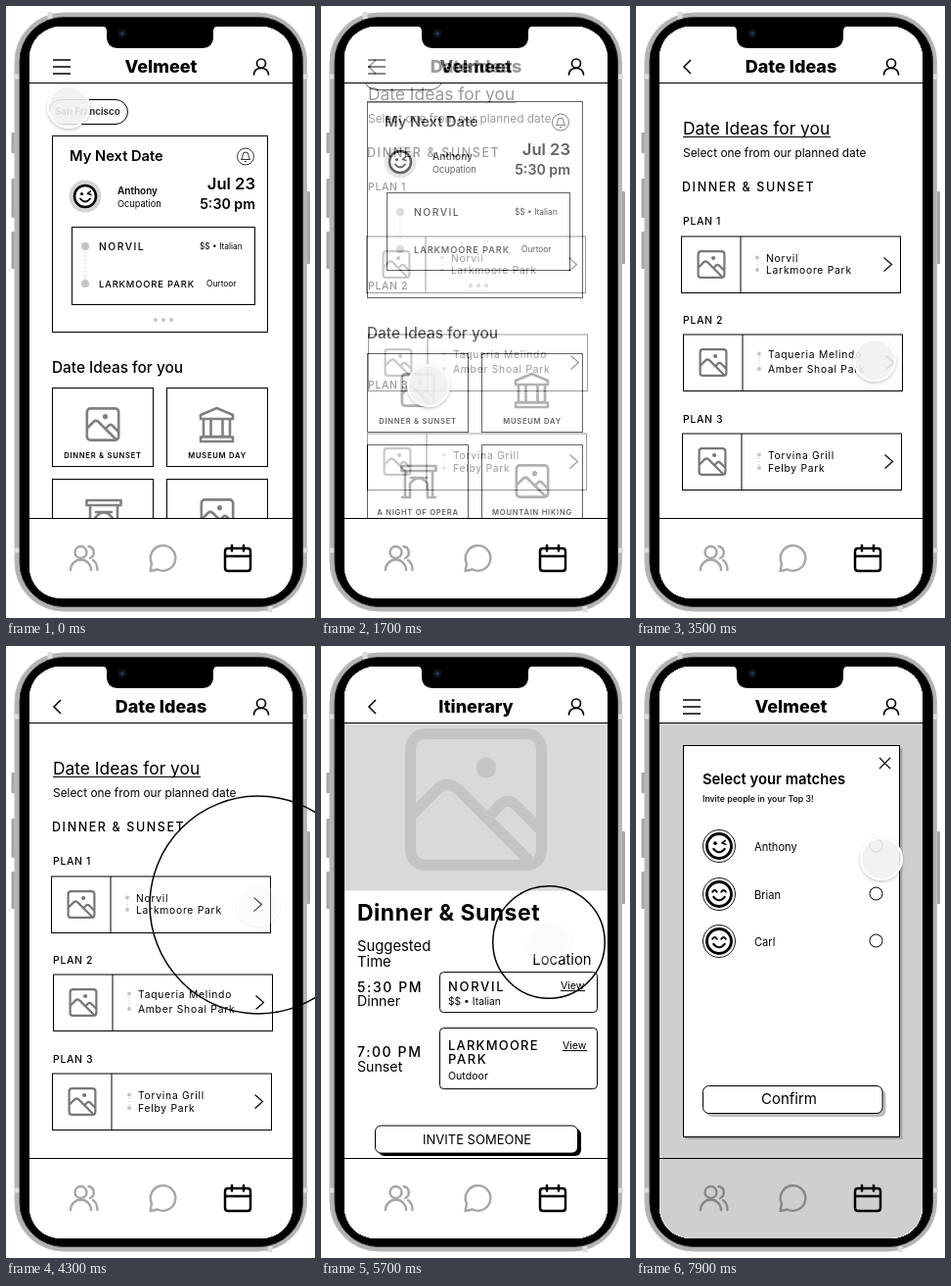
Recreate the animation shown at these times as an HTML page. Size 316x624 px, loop 8000 ms.

```html
<!DOCTYPE html>
<html lang="en">
<head>
<meta charset="utf-8">
<title>Date planner prototype</title>
<style>
html, body { margin: 0; width: 316px; height: 624px; overflow: hidden; background: #fff; }
svg { display: block; font-family: Inter, "Open Sans", sans-serif; }
</style>
</head>
<body>
<svg id="stage" width="316" height="624" viewBox="0 0 316 624"></svg>
<script>
const stage = document.getElementById('stage');

// Drawing helpers
const text = (x, y, str, size, weight = 400, spacing = 0, attrs = '') =>
  `<text x="${x}" y="${y}" font-size="${size}" font-weight="${weight}" letter-spacing="${spacing}" ${attrs}>${str}</text>`;
const middle = 'text-anchor="middle"', end = 'text-anchor="end"';
const rect = (x, y, w, h, fill = '#fff', stroke = '#000', rx = 0) =>
  `<rect x="${x}" y="${y}" width="${w}" height="${h}" rx="${rx}" fill="${fill}" stroke="${stroke}"/>`;
const dot = (x, y, r, fill, stroke = 'none', width = 1) =>
  `<circle cx="${x}" cy="${y}" r="${r}" fill="${fill}" stroke="${stroke}" stroke-width="${width}"/>`;
const line = (d, stroke = '#000', width = 1, attrs = '') =>
  `<path d="${d}" fill="none" stroke="${stroke}" stroke-width="${width}" ${attrs}/>`;
const round = 'stroke-linecap="round" stroke-linejoin="round"';
const group = (id, body) => `<g id="${id}">${body}</g>`;
const clipped = body => `<g clip-path="url(#view)">${body}</g>`;

const picture = (x, y, size, color) => `<g transform="translate(${x} ${y}) scale(${size / 145})">
  <rect x="5.5" y="5.5" width="134" height="134" rx="15" fill="none" stroke="${color}" stroke-width="11"/>
  ${dot(83, 40, 10.5, color)}
  ${line('M6 89L33 62Q43 52 54 62L131 139M83 93L96 79Q104 70 113 78L139 104', color, 11)}</g>`;

const face = (x, y, r, wink) => dot(x, y, r, '#fff', '#000', r * .23) +
  `<g transform="translate(${x} ${y}) scale(${r / 11})">` +
  line('M-5 2.5Q0 8.5 5 2.5', '#000', 1.9, round) +
  (wink ? dot(-3.5, -2.5, 1.6, '#000') + line('M5.5 -5L2.5 -2.8L6 -1.5', '#000', 1.5, round)
        : line('M-6 -2Q-4 -5 -2 -2M2 -2Q4 -5 6 -2', '#000', 1.7, round)) + '</g>';

const person = dot(261, 58.5, 4.5, 'none', '#000', 1.7) +
  line('M253.5 70Q254 63.5 261 63.5T268.5 70', '#000', 1.7, round);
const menuIcon = line('M48 55H66M48 62H66M48 69H66', '#000', 1.5);
const backIcon = line('M56 55L49 62L56 69', '#000', 1.5);
const header = (title, icon) => rect(24, 21, 269, 57, '#fff', 'none') + icon + person +
  text(158.5, 68, title, 18, 800, 0, middle) + line('M24 78.5H293');

const nav = rect(24, 523, 269, 81, '#fff', 'none') + line('M24 522.5H293') +
  dot(76.5, 557, 6, 'none', '#a6a6a6', 2.4) +
  line(`M66 575A10.5 10.5 0 0 1 87 575M84.5 551A6.3 6.3 0 0 1 86 563M89 565Q93.5 568 93.5 575
    M147.5 576L149 568.5A12.8 12.8 0 1 1 155 574.5Z`, '#a6a6a6', 2.4, round) +
  line('M227 553H247Q250 553 250 556V573Q250 576 247 576H227Q224 576 224 573V556Q224 553 227 553ZM224 561H250M231 550V555.5M243 550V555.5', '#000', 2.5, round);

const screen = (id, title, icon, body) => group(id,
  rect(24, 21, 269, 583, '#fff', 'none') + clipped(body) + header(title, icon) + nav);

// Home
const brand = 'Velmeet';
const gray = '#808080', pale = '#c4c4c4';
const tile = (x, y, label) => rect(x, y, 103, 80) + text(x + 51.5, y + 71, label, 7.6, 600, .75, middle);
const museum = line('M199 421V417L215.5 410L232 417V421ZM202 421V439M209.5 421V439M221.5 421V439M229 421V439M202 439H229M199 444H232V439.5H199Z', gray, 2.6, round);
const opera = line('M82.5 504H117.5V509H82.5ZM86 509V536M114 509V536M83 536H91V522Q100 511 109 522V536H117M92 516H108', gray, 2.6, round);
const home = screen('home', brand, menuIcon, group('homeScroll',
  rect(44, 95.5, 80.5, 25, '#fff', '#000', 12.5) + text(50, 111, 'San Francisco', 9.7, 700, 0, 'fill="#333"') +
  rect(47.5, 132.5, 220, 200) + text(65, 158, 'My Next Date', 14.7, 600) +
  dot(245, 153.5, 8.5, 'none', '#000', .8) +
  line('M240.5 156.5Q242 155 242 152Q242 149 245 149T248 152Q248 155 249.5 156.5ZM244 158.5H246', '#000', .8) +
  dot(81, 194, 16.5, '#d4d4d4') + face(81, 194, 11, true) +
  text(114, 192, 'Anthony', 10, 600) + text(114, 205, 'Ocupation', 9.2) +
  text(255, 187, 'Jul 23', 16.6, 600, 0, end) + text(255, 207, '5:30 pm', 14.2, 600, 0, end) +
  rect(67.5, 225.5, 187, 79) + line('M81 250V279', pale, 1, 'stroke-dasharray="1.5 2.5"') +
  dot(81, 245, 4, pale) + dot(81, 283, 4, pale) +
  text(95, 249, 'NORVIL', 10.3, 500, 1.5) + text(198, 248, '$$ • Italian', 8.4) +
  text(95, 286.5, 'LARKMOORE PARK', 9.3, 500, .9) + text(205, 286, 'Ourtoor', 8.4) +
  [153, 161, 169].map(x => dot(x, 320, 2, pale)).join('') +
  text(47, 374, 'Date Ideas for you', 15.4, 500) +
  tile(47.5, 389.5, 'DINNER &amp; SUNSET') + picture(81.5, 409, 35, gray) +
  tile(164.5, 389.5, 'MUSEUM DAY') + museum +
  tile(47.5, 482.5, 'A NIGHT OF OPERA') + opera +
  tile(164.5, 482.5, 'MOUNTAIN HIKING') + picture(198.5, 502, 35, gray)));

// Date ideas
const plan = (x, y, tx, first, second, y1, y2) => rect(x, y, 224, 57.5, 'none') +
  line(`M${x + 60.5} ${y}V${y + 57.5}`) + picture(x + 16, y + 14, 29, '#777') +
  line(`M${tx - 9} ${y1 - 4}V${y2 - 4}`, pale, 1, 'stroke-dasharray="1 2"') +
  dot(tx - 9, y1 - 4.5, 2, pale) + dot(tx - 9, y2 - 4, 2, pale) +
  text(tx, y1, first, 10.3, 400, .75) + text(tx, y2, second, 10.3, 400, .75) +
  line(`M${x + 207} ${y + 21.5}L${x + 215} ${y + 28.5}L${x + 207} ${y + 35.5}`, '#000', 1.2);
const ideas = screen('ideas', 'Date Ideas', backIcon, group('headings',
  text(48, 131, 'Date Ideas for you', 17.4) + line('M48 133.5H199') +
  text(48, 154, 'Select one from our planned date', 11.9) +
  text(47, 189, 'DINNER &amp; SUNSET', 12.5, 500, 1.6) +
  [223, 324, 425].map((y, i) => text(48, y, 'PLAN ' + (i + 1), 10.5, 500, .65)).join('')) +
  plan(46.5, 235, 133, 'Norvil', 'Larkmoore Park', 261, 273) +
  plan(48.5, 335, 135, 'Taqueria Melindo', 'Amber Shoal Park', 359, 374) +
  plan(47.5, 436, 135, 'Torvina Grill', 'Felby Park', 462, 475));

// Itinerary
const view = (x, y) => text(x, y, 'View', 10.6) + line(`M${x} ${y + 1.5}H${x + 25}`);
const itinerary = screen('itinerary', 'Itinerary', backIcon, group('itineraryScroll',
  rect(24, 70, 269, 194.5, '#d9d9d9', 'none') + picture(86, 99, 145, pale) +
  text(37, 295, 'Dinner &amp; Sunset', 23, 700, .5) +
  text(37, 326, 'Suggested', 14.8) + text(37, 342, 'Time', 14.8) + text(276.5, 340, 'Location', 14.8, 400, 0, end) +
  text(37, 368, '5:30 PM', 14, 500, 1.6) + text(37, 382, 'Dinner', 14.2) +
  text(37, 434, '7:00 PM', 14, 500, 1.6) + text(37, 449, 'Sunset', 14.2) +
  rect(121.5, 347.5, 161, 41, '#fff', '#000', 4) + text(130, 367, 'NORVIL', 13, 500, 1.7) +
  text(130, 381, '$$ • Italian', 10.3) + view(245, 365) +
  rect(121.5, 404.5, 161, 62, '#fff', '#000', 4) + text(130, 427, 'LARKMOORE', 13, 500, 1.2) +
  text(130, 441, 'PARK', 13, 500, 1.6) + text(130, 457, 'Outdoor', 10.6) + view(247, 426) +
  rect(59, 507, 207, 28, '#000', 'none', 6) + rect(55.5, 504, 207, 28, '#fff', '#000', 6) +
  text(159.5, 522.5, 'INVITE SOMEONE', 13, 400, 0, middle)));

// Match picker
const match = (y, name, wink) => dot(85, y, 16.5, '#fff', '#000', .9) + face(85, y, 12.5, wink) +
  text(121, y + 4.5, name, 11.1) + dot(245.5, y - .5, 6.5, '#fff', '#000', 1);
const matches = screen('matches', brand, menuIcon, '').replace(/<\/g>$/, '') +
  rect(24, 79, 269, 525, 'rgba(0,0,0,.19)', 'none') +
  rect(50.5, 104, 222, 399, 'rgba(0,0,0,.2)', 'none') + rect(48.5, 101.5, 221, 399) +
  line('M249 114L260 125M260 114L249 125', '#000', 1.2) +
  text(68, 141, 'Select your matches', 14.8, 600) + text(68, 159, 'Invite people in your Top 3!', 8.8, 500) +
  match(204, 'Anthony', true) + match(253, 'Brian') + match(301, 'Carl') +
  rect(72, 452, 183.5, 28, '#bbb', 'none', 6) + rect(68.5, 448.5, 183.5, 28, '#fff', '#000', 6) +
  text(156.5, 467, 'Confirm', 15, 400, 0, middle) + '</g>';

// Phone body
const body = rect(5.5, 129, 6, 21, '#a6a6a6', 'none', 1) + rect(5.5, 176, 6, 40, '#a6a6a6', 'none', 1) +
  rect(5.5, 230, 6, 38, '#a6a6a6', 'none', 1) + rect(305, 189, 6, 74, '#a6a6a6', 'none', 1) +
  rect(9, 7, 298.5, 610, '#b2b2b2', '#bdbdbd', 50) +
  line('M8 72H14M303 72H309M8 555H14M303 555H309M45 6V13M270 612V618', '#ddd', 5) +
  rect(14, 11.5, 289.5, 601, '#000', '#333', 45);
const notch = '<path d="M99 20V21Q103 21 103 26V31Q103 43 115 43H200Q212 43 212 31V26Q212 21 216 21V20Z"/>' +
  dot(119, 28, 4, '#10161f') + dot(119, 28, 1.6, '#23405f');

stage.innerHTML = `<defs>
  <clipPath id="glass"><rect x="24" y="21" width="269" height="583" rx="32"/></clipPath>
  <clipPath id="view"><rect x="24" y="79" width="269" height="443.5"/></clipPath>
  <filter id="soft" x="-30%" y="-30%" width="160%" height="160%">
    <feDropShadow dx="0" dy="1.5" stdDeviation="1.5" flood-opacity=".25"/></filter></defs>
  ${body}<g clip-path="url(#glass)">${home}${ideas}${itinerary}${matches}</g>${notch}
  <circle id="ring" fill="none" stroke="#000" stroke-width="1.5"/>
  <circle id="touch" r="21" fill="#f5f5f5" fill-opacity=".85" stroke="#fff" stroke-width="2" filter="url(#soft)"/>`;

// Motion
const el = id => document.getElementById(id);
const set = (id, attrs) => { for (const k in attrs) el(id).setAttribute(k, attrs[k]); };
const progress = (t, a, b) => Math.min(1, Math.max(0, (t - a) / (b - a)));
const smooth = p => p * p * (3 - 2 * p);
const easeOut = p => 1 - (1 - p) ** 2;
const shift = (id, y) => set(id, { transform: `translate(0 ${y})` });
const dissolve = (id, p) => set(id, { opacity: p, visibility: p ? 'visible' : 'hidden' });

const path = [ // time, x, y
  [0, 64, 103], [900, 98, 330], [1400, 110, 387], [1750, 110, 387], [2100, 126, 424], [2200, 126, 424],
  [2400, 262, 374], [3400, 262, 374], [3500, 244, 361], [3850, 258, 264], [4400, 258, 264],
  [4900, 219, 267], [5100, 219, 267], [5600, 233, 302], [5750, 233, 302], [6000, 244, 298],
  [6300, 224, 476], [6450, 224, 476], [6600, 224, 462], [6800, 224, 476], [7000, 224, 476],
  [7250, 150, 496], [7500, 104, 330], [7700, 150, 165], [7900, 251, 217], [8000, 251, 217]];
const rings = [[3850, 4350, 258, 264, 112], [5400, 5900, 233, 302, 68]]; // start, end, x, y, radius

function touchAt(t) {
  const i = path.findIndex(k => k[0] > t), a = path[i - 1], b = path[i];
  const p = smooth(progress(t, a[0], b[0]));
  return { cx: a[1] + (b[1] - a[1]) * p, cy: a[2] + (b[2] - a[2]) * p };
}

function draw(now) {
  const t = now % 8000;
  shift('homeScroll', -35 * smooth(progress(t, 250, 900)));
  shift('headings', t < 2100 ? -35 : 0);
  shift('itineraryScroll', -53 * smooth(progress(t, 5540, 6000)));
  dissolve('ideas', easeOut(progress(t, 1590, 2100)));
  dissolve('itinerary', easeOut(progress(t, 4350, 4900)));
  dissolve('matches', smooth(progress(t, 6600, 6800)));
  const ring = rings.find(r => t > r[0] && t < r[1]);
  const pressed = ring || (t > 6500 && t < 6750);
  set('touch', { ...touchAt(t), opacity: pressed ? .3 : 1 });
  set('ring', ring ? { cx: ring[2], cy: ring[3], r: ring[4] * easeOut(progress(t, ring[0], ring[1])), opacity: 1 } : { opacity: 0 });
}

const start = performance.now();
function tick() {
  draw(performance.now() - start);
  requestAnimationFrame(tick);
}
tick();
</script>
</body>
</html>
```
